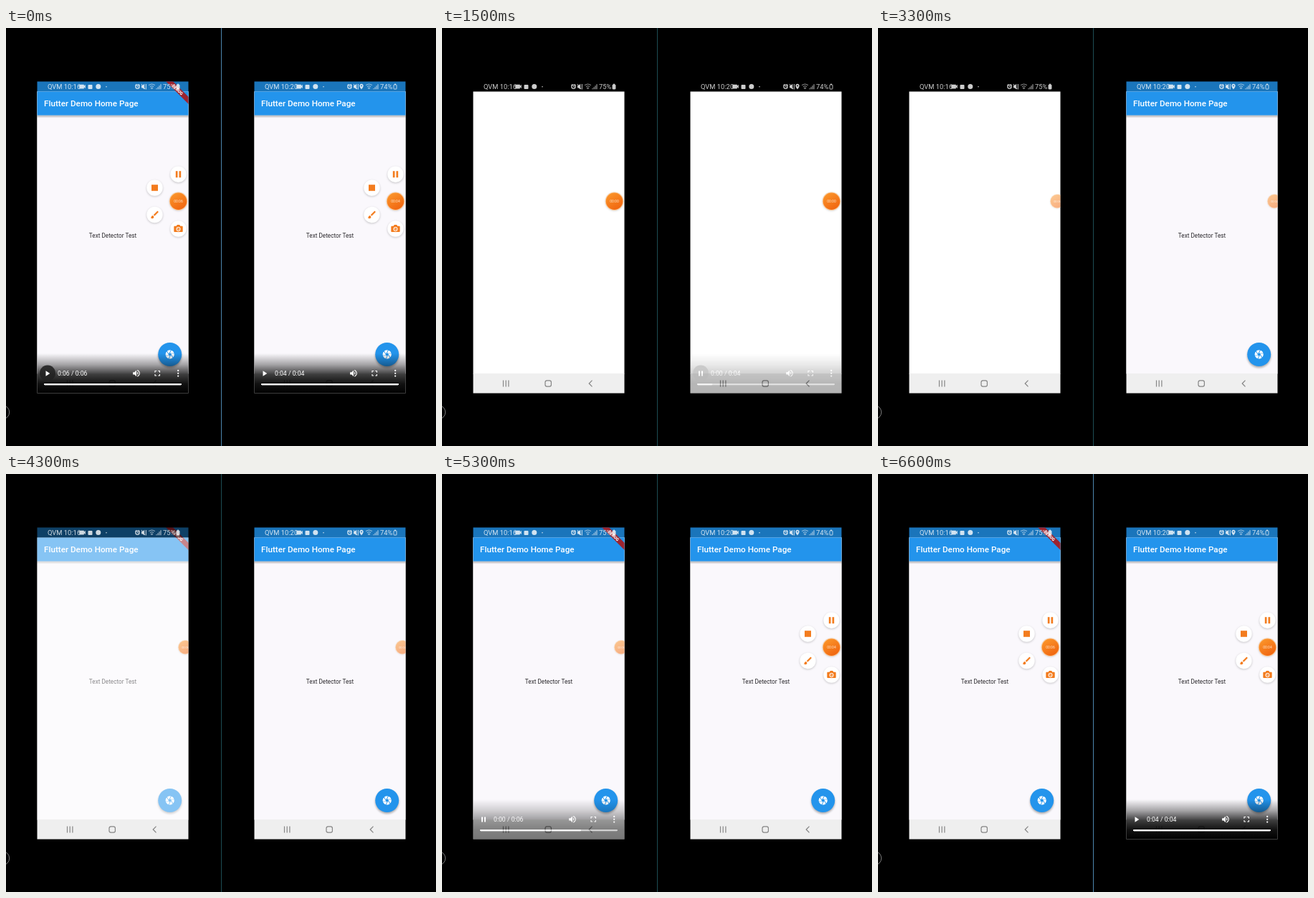
Animation of 600 by 582 pixels, one loop 6700 ms. Source, as an HTML page:

```html
<!DOCTYPE html>
<html lang="en">
<head>
<meta charset="utf-8">
<title>App start comparison</title>
<style>
  html, body { margin: 0; width: 100%; height: 100%; overflow: hidden; background: #000; }
  svg { display: block; width: 600px; height: 582px; font-family: Roboto, "Open Sans", sans-serif; }
</style>
</head>
<body>
<svg id="stage" viewBox="0 0 600 582"></svg>
<script>
const LOOP = 6700, STEP = 100;

const PATHS = {
  play: 'M8 5v14l11-7z',
  pause: 'M6 19h4V5H6v14zm8-14v14h4V5h-4z',
  volume: 'M3 9v6h4l5 5V4L7 9H3zm13.5 3c0-1.77-1.02-3.29-2.5-4.03v8.05c1.48-.73 2.5-2.25 2.5-4.02zM14 3.23v2.06c2.89.86 5 3.54 5 6.71s-2.11 5.85-5 6.71v2.06c4.01-.91 7-4.49 7-8.77s-2.99-7.86-7-8.77z',
  full: 'M7 14H5v5h5v-2H7v-3zm-2-4h2V7h3V5H5v5zm12 7h-3v2h5v-5h-2v3zM14 5v2h3v3h2V5h-5z',
  brush: 'M7 14c-1.66 0-3 1.34-3 3 0 1.31-1.16 2-2 2 .92 1.22 2.49 2 4 2 2.21 0 4-1.79 4-4 0-1.66-1.34-3-3-3zm13.71-9.37l-1.34-1.34c-.39-.39-1.02-.39-1.41 0L9 12.25 11.75 15l8.96-8.96c.39-.39.39-1.02 0-1.41z',
  shutter: 'M9.4 10.5l4.77-8.26C13.47 2.09 12.75 2 12 2c-2.4 0-4.6.85-6.32 2.25l3.66 6.35.06-.1zM21.54 9c-.92-2.92-3.15-5.26-6-6.34L11.88 9h9.66zm.26 1h-7.49l.29.5 4.76 8.25C21 16.97 22 14.61 22 12c0-.69-.07-1.35-.2-2zM8.54 12l-3.9-6.75C3.01 7.03 2 9.39 2 12c0 .69.07 1.35.2 2h7.49l-1.15-2zm-6.08 3c.92 2.92 3.15 5.26 6 6.34L12.12 15H2.46zm11.27 0l-3.9 6.76c.7.15 1.42.24 2.17.24 2.4 0 4.6-.85 6.32-2.25l-3.66-6.35-.93 1.6z',
  video: 'M17 10.5V7c0-.55-.45-1-1-1H4c-.55 0-1 .45-1 1v10c0 .55.45 1 1 1h12c.55 0 1-.45 1-1v-3.5l4 4v-11l-4 4z',
  pin: 'M12 2C8 2 5 5 5 9c0 5.2 7 13 7 13s7-7.800 7-13c0-4-3-7-7-7zm0 4.500a2.500 2.500 0 1 1 0 5 2.500 2.500 0 0 1 0-5z',
  camera: 'M9 3L7 6H3c-1 0-2 1-2 2v11c0 1 1 2 2 2h18c1 0 2-1 2-2V8c0-1-1-2-2-2h-4l-2-3z'
};

const icon = (name, x, y, size, fill = '#fff', cls = '') =>
  `<path class="${cls}" d="${PATHS[name]}" fill="${fill}" transform="translate(${x - size / 2} ${y - size / 2}) scale(${size / 24})"/>`;
const rect = (x, y, w, h, fill, extra = '') =>
  `<rect x="${x}" y="${y}" width="${w}" height="${h}" fill="${fill}" ${extra}/>`;
const disc = (x, y, r, fill, extra = '') =>
  `<circle cx="${x}" cy="${y}" r="${r}" fill="${fill}" ${extra}/>`;
const text = (x, y, size, str, fill, extra = '') =>
  `<text x="${x}" y="${y}" font-size="${size}" fill="${fill}" ${extra}>${str}</text>`;

function statusBar(p) {
  const dx = p.pin ? -7 : 0;
  return `<g opacity=".8">
    ${text(58, 84.900, 9.400, 'QVM ' + p.clock, '#fff')}
    ${icon('video', 106.500, 81.500, 11.500)}
    ${rect(114.500, 79, 6, 6, '#fff', 'rx="1"')}
    ${disc(128.800, 81.500, 3.500, '#fff')}${disc(140, 81.700, .8, '#fff')}
    <g transform="translate(${dx} 0)">
      ${disc(183.500, 81.800, 2.600, 'none', 'stroke="#fff" stroke-width="1.3"')}
      <path d="M180.300 79.800l1.800-1.600M186.700 79.800l-1.800-1.600M183.500 80.500v1.500h1.300" stroke="#fff" fill="none"/>
      <path d="M189 80h1.600l2.600-2.200v7.800l-2.600-2.200H189z" fill="#fff"/>
      <path d="M189 78l5 7M195.300 78v7.500" stroke="#fff" fill="none"/>
    </g>
    ${p.pin ? icon('pin', 193, 81.500, 9) : ''}
    <path d="M199 79.500q4.500-3 9 0M200.800 81.600q2.700-1.800 5.400 0M202.200 83.400q1.300-.8 2.600 0l-1.300 1.600z" stroke="#fff" stroke-width=".9" fill="none" opacity=".8"/>
    <path d="M210 85.200v-1.200M212 85.200v-3M214 85.200v-5M216 85.200v-7" stroke="#fff" stroke-width="1.200" opacity=".75"/>
    ${text(219, 84.900, 9.400, p.battery, '#fff')}
    ${rect(238, 79, 4, 6, p.pin ? 'none' : '#fff', 'rx=".6" stroke="#fff" stroke-width=".9"')}
    ${rect(239, 77.700, 2, 1.300, '#fff')}
  </g>`;
}

const banner = `<g transform="translate(239.500 85.800) rotate(45)">
  ${rect(-36, -3.500, 72, 7, '#9c2430')}
  ${text(0, 2.100, 5.800, 'DEBUG', '#fff', 'text-anchor="middle" font-weight="900"')}
</g>`;

const app = p => `<g class="app">
  ${rect(43, 88, 212, 393, '#faf8fc')}
  ${rect(43, 121.500, 212, 4, 'url(#drop)')}
  ${rect(43, 74, 212, 14.500, '#1a75bb')}
  ${rect(43, 88.500, 212, 33, '#2394ec')}
  ${text(53, 109, 11.700, 'Flutter Demo Home Page', '#fff', 'font-weight="500"')}
  ${text(149, 292, 8.200, 'Text Detector Test', '#2c2a2e', 'text-anchor="middle"')}
  ${disc(228.700, 456.500, 16.500, '#000', 'opacity=".32" filter="url(#blur)"')}
  ${disc(228.700, 454.500, 16.500, '#2394ec')}
  ${icon('shutter', 228.700, 454.500, 14.500)}
  ${p.debug ? banner : ''}
</g>`;

const nav = `${rect(43, 481, 212, 28, '#efefef')}
  <g stroke="#858585" fill="none" stroke-width="1.200">
    <path d="M85.500 490.500v9M89.200 490.500v9M92.900 490.500v9"/>
    <rect x="144" y="490.800" width="8.400" height="8.400" rx="2.400"/>
    <path d="M209.500 490.700l-4.300 4.300 4.300 4.300"/>
  </g>`;

function recorder() {
  const orange = '#f37c1e';
  const items = [
    [240.500, 203.700, rect(-3.700, -4.500, 2.700, 9, orange) + rect(1, -4.500, 2.700, 9, orange)],
    [207.500, 222.500, rect(-4.500, -4.300, 9, 8.600, orange)],
    [207.500, 260, icon('brush', 0, 0, 14, orange)],
    [240.500, 279.500, icon('camera', 0, -.5, 13.500, orange) + disc(0, .5, 3, '#fff') +
      disc(0, .5, 2, orange) + '<path d="M-1 -.5L1 1.500" stroke="#fff" stroke-width=".8"/>']
  ];
  return items.map(([x, y, art]) => `<g class="item" data-x="${x}" data-y="${y}">
      ${disc(0, 1, 11.300, '#000', 'opacity=".2" filter="url(#blur)"')}${disc(0, 0, 11.200, '#fff')}${art}</g>`).join('') +
    `<g class="knob">${disc(0, .8, 12.500, '#000', 'opacity=".18" filter="url(#blur)"')}
      ${disc(0, 0, 12.700, '#fbc793')}${disc(0, 0, 11.700, 'url(#orange)')}
      ${text(0, 1.800, 5, '', '#ffe6cf', 'class="count" text-anchor="middle"')}</g>`;
}

const player = `<g class="player">
  ${rect(43, 453, 212, 56, 'url(#shade)')}
  ${disc(58, 480.500, 11, '#222', 'class="focus" opacity=".88"')}
  ${icon('play', 57.600, 481, 12.600, '#fff', 'play')}${icon('pause', 58, 481, 12, '#fff', 'pause')}
  ${text(72, 484.300, 8.700, '', '#fff', 'class="label"')}
  ${icon('volume', 182, 480.800, 13)}${icon('full', 211.200, 480.800, 13)}
  ${[477, 480.800, 484.600].map(y => disc(240.200, y, 1.150, '#fff')).join('')}
  ${rect(53, 495, 192, 2.200, '#b4b4b4', 'rx="1.100"')}
  ${rect(53, 495, 192, 2.200, '#fff', 'class="bar" rx="1.100"')}
</g>`;

const phone = p => `<g id="${p.id}" transform="translate(${p.x} 0)"><g clip-path="url(#screen)">
  ${rect(43, 88.500, 212, 393, '#fff')}${app(p)}${statusBar(p)}${nav}${recorder()}${player}
</g></g>`;

// Each track is a list of [time, value] points; equal neighbours hold.
const phones = [
  {
    id: 'debug', x: 0, clock: '10:16', battery: '75%', debug: true, total: '0:06', count: '00:06',
    start: 300, end: 6500, reset: 200, focus: [0, 700],
    app: [[200, 1], [300, 0], [4200, 0], [4300, .55], [4600, 1]],
    menu: [[200, 1], [300, 0], [6000, 0], [6300, 1]],
    fade: [[1500, 0], [1700, 1], [5800, 1], [6000, 0]],
    slide: [[1700, 0], [2000, 9.500], [5700, 9.500], [6000, 0]],
    player: [[600, 1], [950, 0], [4500, 0], [4700, 1], [5100, 1], [5500, 0]],
    bar: [[100, 1], [200, 0], [500, 0], [4900, .67], [6500, .93]]
  },
  {
    id: 'release', x: 303, clock: '10:20', battery: '74%', pin: true, total: '0:04', count: '00:04',
    start: 1000, end: 5500, reset: 800, focus: [800, 1700],
    app: [[900, 1], [1000, 0], [1700, 0], [2000, 1]],
    menu: [[900, 1], [1000, 0], [5000, 0], [5300, 1]],
    fade: [[2100, 0], [2300, 1], [4500, 1], [4700, 0]],
    slide: [[2300, 0], [2600, 9.500], [4400, 9.500], [4700, 0]],
    player: [[1200, 1], [1600, 0], [5660, 0], [5960, 1]],
    bar: [[700, 1], [800, 0], [1000, 0], [5500, 1]]
  }
];

const stage = document.getElementById('stage');
stage.innerHTML = `<defs>
  <clipPath id="screen"><rect x="43.500" y="74.500" width="211" height="434"/></clipPath>
  <filter id="blur" x="-40%" y="-40%" width="180%" height="180%"><feGaussianBlur stdDeviation="1.500"/></filter>
  <linearGradient id="drop" x2="0" y2="1"><stop stop-opacity=".3"/><stop offset="1" stop-opacity="0"/></linearGradient>
  <linearGradient id="orange" x1=".2" x2=".8" y2="1"><stop stop-color="#fb962b"/><stop offset="1" stop-color="#f0630f"/></linearGradient>
  <linearGradient id="shade" x2="0" y2="1"><stop stop-opacity="0"/><stop offset=".28" stop-opacity=".34"/>
    <stop offset=".52" stop-opacity=".74"/><stop offset=".76" stop-opacity=".93"/><stop offset="1"/></linearGradient>
</defs>
${rect(0, 0, 600, 582, '#000')}
${rect(300, 0, 1, 582, '#4d86ad', 'id="divider"')}
${disc(-5, 535, 9.700, 'none', 'stroke="#8a8a8a" stroke-width=".9"')}
${phones.map(phone).join('')}`;

const divider = document.getElementById('divider');
for (const p of phones) {
  const root = document.getElementById(p.id);
  p.el = {};
  for (const c of ['app', 'player', 'focus', 'play', 'pause', 'label', 'bar', 'knob', 'count'])
    p.el[c] = root.querySelector('.' + c);
  p.items = [...root.querySelectorAll('.item')];
}

function at(track, t) {
  const i = track.findIndex(k => k[0] >= t);
  if (i < 0) return track[track.length - 1][1];
  if (i === 0) return track[0][1];
  const [t0, a] = track[i - 1], [t1, b] = track[i];
  return a + (b - a) * (t - t0) / (t1 - t0);
}
const show = (el, on) => el.setAttribute('visibility', on ? 'inherit' : 'hidden');
const setText = (el, s) => { if (el.textContent !== s) el.textContent = s; };

function drawPhone(p, t) {
  const { el } = p, playing = t >= p.start && t < p.end;
  el.app.setAttribute('opacity', at(p.app, t));
  el.player.setAttribute('opacity', at(p.player, t));
  show(el.focus, t >= p.focus[0] && t < p.focus[1]);
  show(el.play, !playing);
  show(el.pause, playing);
  setText(el.label, (t >= p.reset && t < p.end ? '0:00' : p.total) + ' / ' + p.total);
  el.bar.setAttribute('width', 192 * at(p.bar, t));

  const fade = at(p.fade, t), slide = at(p.slide, t), open = at(p.menu, t);
  el.knob.setAttribute('opacity', 1 - .48 * fade);
  el.knob.setAttribute('transform',
    `translate(${240.500 + slide} 241.200) scale(${1 - .1 * fade - .012 * slide})`);
  setText(el.count, t >= p.start && t < 3000 ? '00:00' : p.count);
  for (const item of p.items) {
    const { x, y } = item.dataset;
    item.setAttribute('transform',
      `translate(${240.500 + (x - 240.500) * open} ${241.200 + (y - 241.200) * open})`);
    item.setAttribute('opacity', open);
  }
}

const origin = performance.now();
function frame() {
  const time = Math.max(0, performance.now() - origin) % LOOP;
  const t = Math.floor(time / STEP) * STEP;
  divider.setAttribute('fill', t < 500 || t >= 6500 ? '#4d86ad' : '#1d4c54');
  for (const p of phones) drawPhone(p, t);
  requestAnimationFrame(frame);
}
frame();
</script>
</body>
</html>
```
